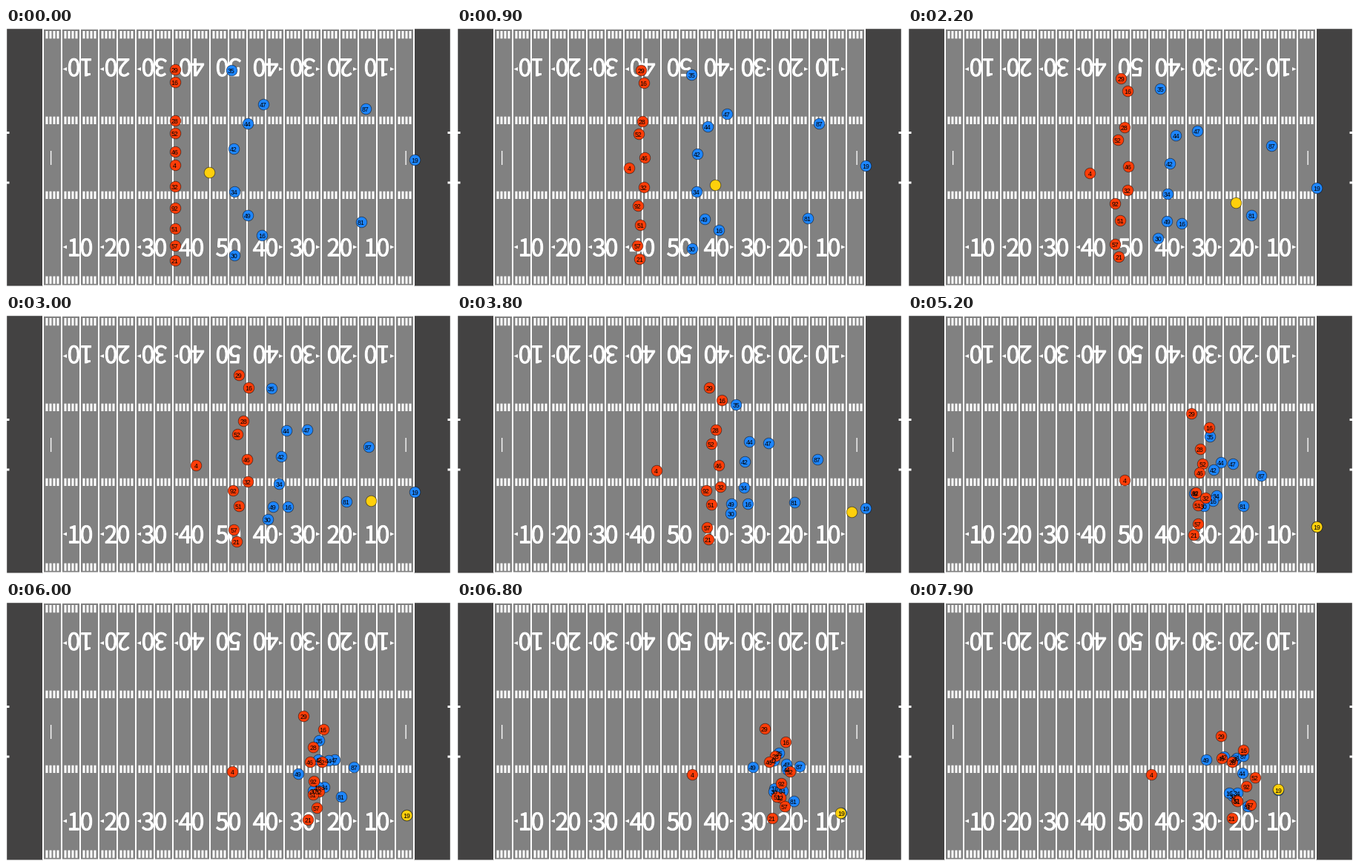
A matplotlib script for the animation above (8 s loop, 600 px wide and 350 px high).

```python
import numpy as np
import matplotlib.pyplot as plt
from matplotlib.animation import FuncAnimation
from matplotlib.patches import Polygon, Rectangle
from matplotlib.patheffects import withStroke

W, H, DPI = 600, 350, 100
PX = 72 / DPI
FRAMES, STEP = 80, 100
PLAY, CATCH = 7900, 4400
LINE = 227.5
RED, BLUE, GOLD = "#ff3d08", "#1e86ff", "#ffd00c"

fig = plt.figure(figsize=(W / DPI, H / DPI), dpi=DPI, facecolor="white")
ax = fig.add_axes([0, 0, 1, 1])
ax.set_xlim(0, W)
ax.set_ylim(H, 0)
ax.axis("off")


def box(x, y, w, h, color="white"):
    ax.add_patch(Rectangle((x, y), w, h, fc=color, lw=0, snap=False, zorder=1))


def yard_label(x, number, side):
    """Digits either side of the yard line, on both sidelines, with an arrow."""
    bold = [withStroke(linewidth=0.9 * PX, foreground="white")]
    for y, arrow_y, turn in ((299.2, 296, 0), (50.5, 55.5, 180)):
        digits = number[::-1] if turn else number
        for dx, digit in zip((-8.5, 8.5), digits):
            ax.text(x + dx, y, digit, color="white", fontsize=32 * PX, rotation=turn,
                    family="Noto Sans CJK JP", ha="center", va="center",
                    path_effects=bold, zorder=2)
        if side:
            tip, base = x + side * 23.5, x + side * 18
            ax.add_patch(Polygon([(tip, arrow_y), (base, arrow_y - 2.5), (base, arrow_y + 2.5)],
                                 fc="white", lw=0, zorder=2))


def draw_field():
    box(1.2, 1.2, 597.6, 347.3, "#434242")
    box(50, 1, 500, 347.5, "#818181")
    box(50, 0, 500, 2)
    box(50, 347.5, 500, 2.5)
    for x in range(50, 551, 25):
        box(x - 1, 1, 2, 347.5)
    for x in range(50, 550, 25):
        for k in range(1, 5):
            for y in (4, 119.7, 220.7, 335.5):
                box(x + 5 * k - 1.5, y, 3, 10.3)
    for x in (60, 538.5):
        box(x, 166, 1.3, 19)
    for x in (0, 595.5):
        for y in (140, 207.5):
            box(x, y, 4.5, 3)
    for i in range(1, 10):
        yard_label(50 + 50 * i, str(10 * min(i, 10 - i)), np.sign(i - 5))


def ease(u):
    u = np.clip(u, 0, 1)
    return u * u * (3 - 2 * u)


def run(start, end, bend=(0, 0)):
    """Upfield first, closing in on the carrier later; bend bows the path."""
    start, end, bend = (np.array(p, float) for p in (start, end, bend))

    def at(now):
        u = now / PLAY
        advance = (np.sin(np.pi / 2 * u) + ease(u)) / 2
        close_in = ease(u ** 1.3)
        return start + (end - start) * (advance, close_in) + bend * np.sin(np.pi * u)

    return at


def carrier(now):
    """Drifts across to the landing spot, then brings the ball back."""
    x = 551 - 52 * ease((now - 5200) / 2700)
    y = 178 + 110 * ease(now / 5600) - 39 * ease((now - 6500) / 1800)
    return np.array([x, y])


def ball_at(now):
    if now >= CATCH:
        return carrier(now) - 0.5
    u = now / CATCH
    return np.array([274 + 277 * (1 - (1 - u) ** 1.35), 195 + 82 * u])


players = []


def player(team, number, path):
    label = ax.text(0, 0, str(number), fontsize=8.8 * PX, family="Liberation Sans",
                    ha="center", va="center", zorder=8)
    players.append((team, path, label))


def dots(color, zorder):
    return ax.scatter([], [], s=(14.6 * PX) ** 2, c=color, edgecolors="#00000090",
                      linewidths=0.8 * PX, zorder=zorder)


draw_field()

# number, starting y on the kick-off line, end point, bend
for number, y, end, bend in (
        (29, 56, (422, 181), (0, 0)),
        (16, 73, (452, 200), (0, 0)),
        (28, 125, (437, 216), (0, 0)),
        (52, 142, (468, 237), (-24, 0)),
        (46, 167, (423, 211), (12, 21)),
        (4, 185, (328, 233), (-17, 9)),
        (32, 214, (443, 268), (3, 0)),
        (92, 243, (456, 249), (-24, -8)),
        (51, 271, (444, 269), (-10, -14)),
        (57, 294, (462, 274), (-26, 0)),
        (21, 314, (437, 292), (-10, -4))):
    player(RED, number, run((LINE, y), end, bend))

# number, start, end, bend
for number, start, end, bend in (
        (35, (304, 57), (443, 211), (-8, 13)),
        (47, (347, 103), (440, 214), (19, 33)),
        (44, (326, 129), (451, 231), (-4, 8)),
        (42, (307, 163), (426, 209), (12, 20)),
        (34, (308, 221), (444, 258), (0, 0)),
        (49, (326, 253), (402, 213), (0, 15)),
        (16, (345, 280), (433, 258), (-4, -18)),
        (30, (308, 307), (438, 262), (-14, -24)),
        (81, (479, 262), (458, 276), (-12, -14)),
        (87, (485, 109), (452, 208), (20, 53))):
    player(BLUE, number, run(start, end, bend))
player(BLUE, 19, carrier)

marks = {BLUE: dots(BLUE, 4), RED: dots(RED, 5)}
ball = dots(GOLD, 6)


def update(frame):
    now = frame * STEP
    spots = {team: [] for team in marks}
    for team, path, label in players:
        x, y = path(now)
        spots[team].append((x, y))
        label.set_position((x, y + 1.5))
    for team, mark in marks.items():
        mark.set_offsets(spots[team])
    ball.set_offsets([ball_at(now)])
    return [*marks.values(), ball, *(label for _, _, label in players)]


anim = FuncAnimation(fig, update, frames=FRAMES, interval=STEP, repeat=True, repeat_delay=0)
plt.show()
```
